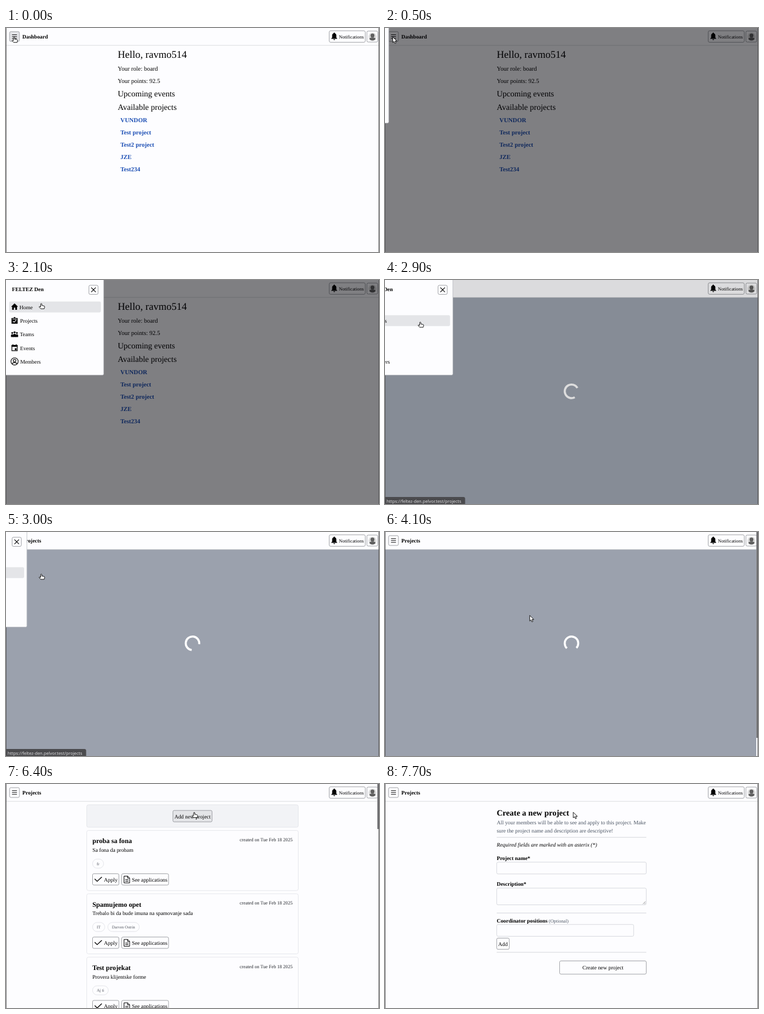
These frames come from a looping animation (640 px wide and 383 px high, 8 s). An HTML page:

```html
<!DOCTYPE html>
<html lang="en">
<head>
<meta charset="utf-8">
<title>Dashboard</title>
<style>
  html, body { margin: 0; width: 100%; height: 100%; overflow: hidden; background: #fdfdff; }
  svg { display: block; width: 100%; height: 100%; font-family: "Liberation Serif", "Times New Roman", serif; text-rendering: geometricPrecision; }
  .status { font-family: "Noto Sans", "Open Sans", sans-serif; }
</style>
</head>
<body>
<svg id="stage" viewBox="0 0 640 383" xmlns="http://www.w3.org/2000/svg"></svg>
<script>
const LOOP = 8000, STEP = 100;
const PAPER = '#fdfdff', INK = '#000', GREY = '#4b5563', HOVER = '#e4e5e8';
const BODY = 9.33, SMALL = 8.17, TINY = 7;

// Markup helpers
const text = (x, y, size, content, attrs = '') =>
  `<text x="${x}" y="${y}" font-size="${size}" ${attrs}>${content}</text>`;
const bold = (x, y, size, content, attrs = '') => text(x, y, size, content, 'font-weight="700" ' + attrs);
const box = (x, y, w, h, stroke = '#8b8d92', fill = 'none', r = 2.3, attrs = '') =>
  `<rect x="${x}" y="${y}" width="${w}" height="${h}" rx="${r}" fill="${fill}" stroke="${stroke}" stroke-width=".8" ${attrs}/>`;
const line = (d, width = 1, stroke = INK, attrs = '') =>
  `<path d="${d}" fill="none" stroke="${stroke}" stroke-width="${width}" ${attrs}/>`;
const shape = (d, fill = INK) => `<path d="${d}" fill="${fill}"/>`;
const dot = (x, y, r, fill = INK) => `<circle cx="${x}" cy="${y}" r="${r}" fill="${fill}"/>`;
const group = (id, content, attrs = '') => `<g id="${id}" ${attrs}>${content}</g>`;
const at = (x, y, content) => `<g transform="translate(${x} ${y})">${content}</g>`;
const MIDDLE = 'text-anchor="middle"';

function header() {
  const bell = shape('M-5 4.2V3.4L-3.6 2V-1.6C-3.6-3.8-2.4-5-.9-5.3V-5.8A.9.9 0 0 1 .9-5.8V-5.3C2.4-5 3.6-3.8 3.6-1.6V2L5 3.4V4.2ZM-1.4 4.9H1.4A1.4 1.4 0 0 1-1.4 4.9Z');
  const avatar = dot(0, 0, 6.8, '#dcdcdc') + dot(0, -1.8, 3.3, '#5f5f5f') +
    shape('M-5.3 4.3C-4.8 1.8-2.4 1.6 0 1.6S4.8 1.8 5.3 4.3A6.8 6.8 0 0 1-5.3 4.3Z', '#5f5f5f');
  return `<rect width="640" height="30" fill="${PAPER}"/>` + line('M0 29.7H640', .8, '#d4d5d8') +
    box(6.2, 6.2, 16.8, 16.8, '#8b8d92', PAPER, 2.3, 'id="menuButton"') +
    line('M10.3 11.5H18.8M10.3 14.6H18.8M10.3 17.7H18.8', .9) +
    bold(28, 18, BODY, '', 'id="title"') +
    box(554.6, 4.8, 61.8, 19.6) + at(563.2, 14.4, bell) + text(571.3, 17.6, SMALL, 'Notifications') +
    box(619.2, 5.2, 18.6, 18.8) + at(628.8, 14.7, avatar);
}

function dashboard() {
  const links = ['VUNDOR', 'Test project', 'Test2 project', 'JZE', 'Test234'];
  return text(191.7, 51.3, 17.5, 'Hello, ravmo514') +
    text(191.7, 72.8, 10.5, 'Your role: board') +
    text(191.7, 93.8, 10.5, 'Your points: 92.5') +
    text(191.7, 116.5, 14, 'Upcoming events') +
    text(191.7, 139.8, 14, 'Available projects') +
    links.map((name, i) => bold(196.3, 161.2 + i * 21, 10.5, name, 'fill="#1d4fb4"')).join('');
}

function loading() {
  return '<rect y="30" width="640" height="353" fill="#9ba1ad"/>' +
    line('M8.2-8.2A11.6 11.6 0 1 1-8.2-8.2', 3.5, '#fff', 'id="spinner"');
}

function card(index, title, about, tags) {
  const doc = line('M-4.7-5.8H1.7L4.9-2.6V5.8H-4.7ZM1.4-5.6V-2.3H4.7M-2.6 .4H2.8M-2.6 3H2.8', 1);
  const pills = tags.map(([x, w, label]) =>
    box(x, 49, w, 15.6, '#dddfe4', PAPER, 7.8) + text(x + w / 2, 59.3, TINY, label, MIDDLE + ' fill="#52565e"')).join('');
  return at(0, 79.4 + index * 108.3,
    box(138.5, 0, 363, 102.8, '#e1e3e8', PAPER, 3, `id="card${index}"`) +
    bold(148.2, 22, 11.67, title) +
    text(491.8, 18.6, SMALL, 'created on Tue Feb 18 2025', 'text-anchor="end" fill="#25282d"') +
    text(148.2, 36.5, BODY, about) + pills +
    box(148.5, 74, 45.2, 19.4) +
    line('M152.2 82.8L156.4 87L164.4 79.6', 1.3, INK, 'class="check" pathLength="100"') +
    text(168, 87.4, BODY, 'Apply') +
    box(198.5, 74, 80.4, 19.4) + at(207.2, 83.9, doc) + text(216, 87.4, BODY, 'See applications'));
}

function projects() {
  return box(138.5, 35.6, 363, 38.4, '#e1e3e8', '#f2f3f6', 3) +
    box(286.4, 45.2, 67.2, 19.6, '#8b8d92', 'none', 2.3, 'id="addButton"') +
    text(320, 58.5, BODY, 'Add new project', MIDDLE) +
    card(0, 'proba sa fona', 'Sa fona da probam', [[148.5, 19, 'fr']]) +
    card(1, 'Spamujemo opet', 'Trebalo bi da bude imuna na spamovanje sada', [[148.5, 21, 'IT'], [174.7, 54, 'Darven Ostrin']]) +
    card(2, 'Test projekat', 'Provera klijentske forme', [[148.5, 27, 'Aj ti']]);
}

function form() {
  const left = 191.7, rule = y => line(`M${left} ${y}H448.3`, .8, '#cbcdd2');
  const field = (y, w, h) => box(left, y, w, h, '#cfd1d6');
  return bold(left, 53.7, 14, 'Create a new project') +
    text(left, 69, BODY, 'All your members will be able to see and apply to this project. Make', `fill="${GREY}"`) +
    text(left, 83, BODY, 'sure the project name and description are descriptive!', `fill="${GREY}"`) +
    rule(91.2) +
    text(left, 106.8, BODY, 'Required fields are marked with an asterix (*)', 'font-style="italic"') +
    bold(left, 130, BODY, 'Project name*') + field(133.6, 256.6, 20.2) +
    bold(left, 174, BODY, 'Description*') + field(178, 256.6, 28.6) +
    line('M442.5 205.3L447 200.8M445.2 205.3L447 203.5', .7, '#666') +
    rule(220.6) +
    bold(left, 236.5, BODY, 'Coordinator positions') + text(281, 236.5, SMALL, '(Optional)', `fill="${GREY}"`) +
    field(240.2, 235, 20.2) +
    box(left, 263.5, 21.5, 19.2) + text(202.4, 276.5, BODY, 'Add', MIDDLE) +
    rule(287.8) +
    box(299.6, 302.5, 148.7, 22.6) + text(374, 317.3, BODY, 'Create new project', MIDDLE);
}

function drawer() {
  const person = (x, y, r) => dot(x, y, r) + shape(`M${x - r * 1.4} 5V${y + r * 2.2}Q${x} ${y + r * .6} ${x + r * 1.4} ${y + r * 2.2}V5Z`);
  const items = [
    ['Home', 23, shape('M0-5.8L6 0H4.2V5.2H1.2V1.5H-1.2V5.2H-4.2V0H-6Z')],
    ['Projects', 24.2, shape('M-5.2-4.2H-1.6A1.6 1.6 0 0 1 1.6-4.2H5.2V5.5H-5.2Z') +
      line('M-3.6-2.4H3.6M-2.8 1L-.8 3L3-1', 1.1, PAPER)],
    ['Teams', 23.8, person(-4, -1.9, 1.5) + person(4, -1.9, 1.5) + person(0, -3, 1.8)],
    ['Events', 24.2, line('M-4.6-4H4.6V5H-4.6ZM-2.8-6V-4M2.8-6V-4', 1.2) +
      shape('M-5-4.5H5V-1.5H-5ZM.4 .8H3.4V3.8H.4Z')],
    ['Members', 24.4, `<circle r="6.2" fill="none" stroke="${INK}" stroke-width="1.1"/><circle cy="-1.4" r="2.3" fill="none" stroke="${INK}" stroke-width="1.1"/>` +
      line('M-4 4.6Q-3.4 1.9 0 1.9T4 4.6', 1.1)]
  ];
  return box(-2, -3, 169.6, 165.6, '#b9bac0', PAPER) +
    bold(10.3, 19.4, BODY, 'FELTEZ Den') +
    box(142.2, 9, 15.8, 15.6) + line('M146.2 12.9L154 20.7M154 12.9L146.2 20.7', 1.1) +
    `<rect id="rowHover" x="5.5" width="157.3" height="18.6" rx="2.3" fill="${HOVER}"/>` +
    items.map(([label, x, icon], i) =>
      at(0, i * 23.35, at(14.7, 45.8, icon) + text(x, 49.6, BODY, label))).join('');
}

const pointer = 'fill="#fff" stroke="#000" stroke-width=".9" stroke-linejoin="round"';
document.getElementById('stage').innerHTML =
  `<rect width="640" height="383" fill="${PAPER}"/>` +
  group('dashboard', dashboard()) + group('loading', loading()) +
  group('projects', projects()) + group('form', form()) + header() +
  group('scrollbar', `<rect x="637" width="3" height="383" fill="${PAPER}"/><rect id="thumb" x="637.3" width="2" fill="#66666a"/>`) +
  '<rect id="overlay" width="640" height="383" fill="#020306"/>' +
  line('M.4 0V383M639.6 0V383', .8, '#4a4a4c') +
  group('drawer', drawer()) +
  group('status', '<path d="M0 371H134.5Q137.5 371 137.5 374V383H0Z" fill="#4b4b4e"/>' +
    text(2.8, 380.6, 7.38, 'https://feltez-den.pelvor.test/projects', 'class="status" fill="#dedee0"')) +
  group('cursor',
    `<path id="arrow" ${pointer} d="M0 0V9.6L2.2 7.6L3.8 11.1L5.5 10.3L4 7H7Z"/>` +
    `<path id="hand" ${pointer} d="M-1 .8Q0-.4 1 .8V3.6L4.4 4.2Q6 4.6 5.8 6.2L5 9.2H-.8L-3.6 6.2Q-3.6 4.9-2.4 5.2L-1 6Z"/>`);

const el = {};
document.querySelectorAll('[id]').forEach(node => el[node.id] = node);
const checks = document.querySelectorAll('.check');

// Timing helpers
const clamp = v => Math.max(0, Math.min(1, v));
const smooth = p => p * p * (3 - 2 * p);
const ramp = (t, from, to) => clamp((t - from) / (to - from));
const between = (t, from, to) => t >= from && t < to;
const show = (node, on) => node.setAttribute('display', on ? 'inline' : 'none');

function track(keys, t) {
  const next = keys.findIndex(key => key[0] > t);
  if (next < 0) return keys[keys.length - 1].slice(1);
  const a = keys[next - 1], b = keys[next], p = ramp(t, a[0], b[0]);
  return a.slice(1).map((v, i) => v + (b[i + 1] - v) * p);
}

const cursorPath = [
  [0, 14, 15.5], [300, 14, 15.5], [400, 13.3, 15.3], [1000, 13.3, 15.3], [1800, 42, 21],
  [2100, 60.5, 40], [2700, 60.5, 71.7], [3700, 60.5, 71.7], [4100, 248.3, 142.6],
  [4500, 338.3, 122.3], [6100, 338.3, 122.3], [6400, 323, 48.3], [LOOP, 323, 48.3]
];
const checkPath = [[0, 0], [4900, 12], [5100, 20], [5400, 32], [5800, 100], [LOOP, 100]];

function render(t) {
  const view = t < 2900 ? 'dashboard' : t < 5000 ? 'loading' : t < 7600 ? 'projects' : 'form';
  for (const name of ['dashboard', 'loading', 'projects', 'form']) show(el[name], name === view);
  el.title.textContent = view === 'dashboard' ? 'Dashboard' : 'Projects';
  el.menuButton.setAttribute('fill', t < 400 ? HOVER : PAPER);

  const open = smooth(ramp(t, 445, 900)) - smooth(ramp(t, 2790, 3090));
  show(el.drawer, open > 0);
  el.drawer.setAttribute('transform', `translate(${(open - 1) * 168} 0)`);
  el.overlay.setAttribute('opacity', .5 * (ramp(t, 300, 450) - ramp(t, 2790, 2940)));
  show(el.rowHover, t >= 2000);
  el.rowHover.setAttribute('y', t < 2500 ? 36.8 : 60.2);
  show(el.status, between(t, 2800, 3400));

  el.spinner.setAttribute('transform', `translate(320 190.3) rotate(${142 + (t - 3000) * .36})`);
  show(el.scrollbar, between(t, 3400, 7600));
  el.thumb.setAttribute('height', view === 'loading' ? 352 : 77);

  const onButton = t >= 6300;
  el.card0.setAttribute('fill', onButton ? PAPER : '#f1f2f5');
  el.addButton.setAttribute('fill', onButton ? HOVER : 'none');
  const [drawn] = track(checkPath, t);
  checks.forEach(check => check.setAttribute('stroke-dasharray', `${drawn} 200`));

  const [x, y] = track(cursorPath, t);
  const hand = t < 400 || between(t, 2000, 3300) || between(t, 5000, 7600);
  el.cursor.setAttribute('transform', `translate(${x} ${y})`);
  show(el.hand, hand);
  show(el.arrow, !hand);
}

const start = performance.now();
function tick() {
  const t = (performance.now() - start) % LOOP;
  render(Math.floor(t / STEP) * STEP);
  requestAnimationFrame(tick);
}
tick();
</script>
</body>
</html>
```
